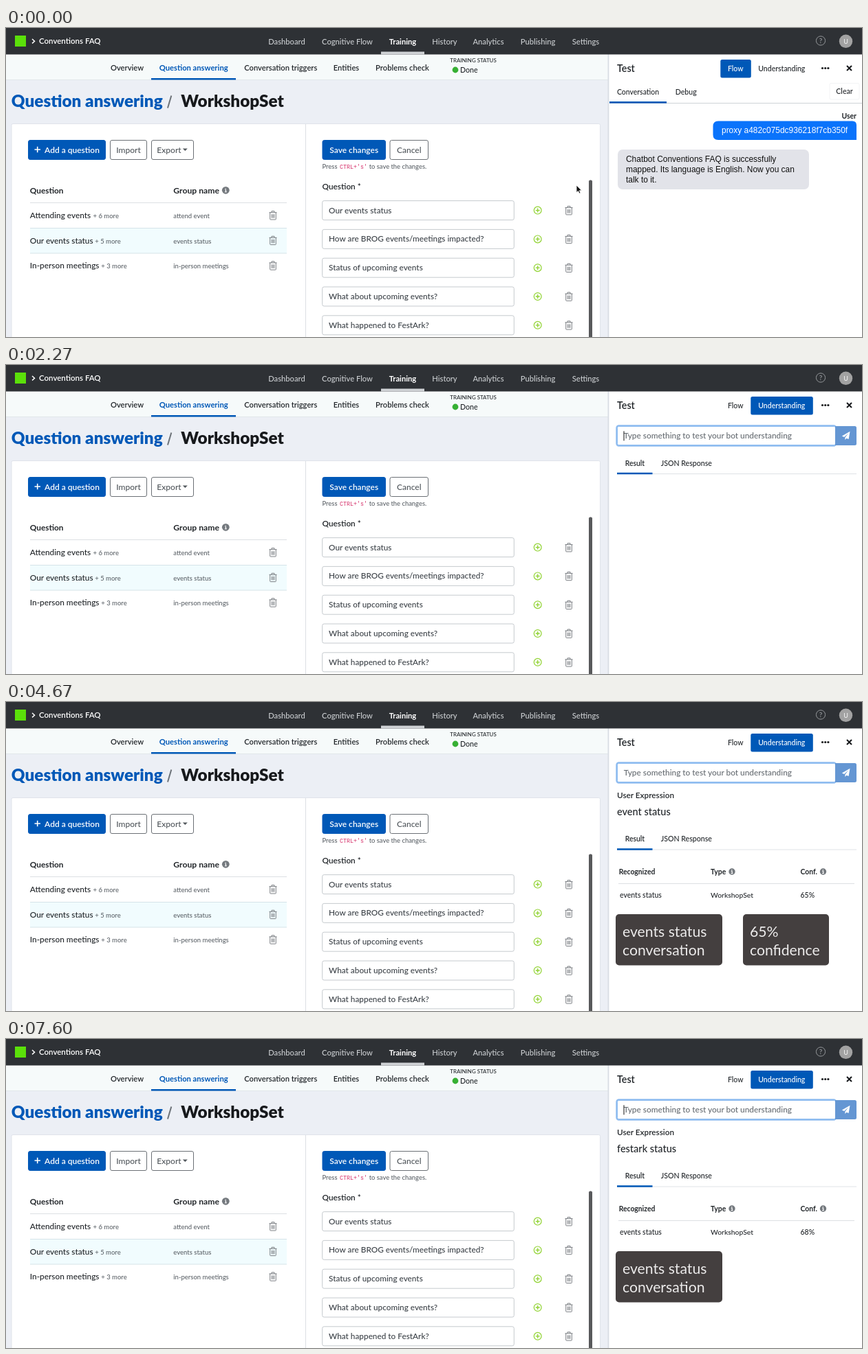
These frames come from a looping animation (1244 by 450 pixels, 8 s). An HTML page:

```html
<!DOCTYPE html>
<html lang="en">
<head>
<meta charset="utf-8">
<title>Bot training</title>
<style>
html, body { margin: 0; width: 100%; height: 100%; overflow: hidden; background: #fff; }
svg { display: block; width: 100%; height: 100%; }
text { font-family: Lato, "Open Sans", sans-serif; white-space: pre; }
.chat { font-family: "Liberation Sans", Arial, sans-serif; }
.mono { font-family: "Liberation Mono", "DejaVu Sans Mono", monospace; }
</style>
</head>
<body>
<svg id="stage" viewBox="0 0 1244 450" preserveAspectRatio="none"></svg>
<script>
const LOOP = 8000;
const BLUE = '#0058b7', INK = '#22262a', GREY = '#5c6268', LINE = '#dcdfe3';

// Markup helpers
const attrs = o => Object.entries(o).map(([k, v]) => ` ${k}="${v}"`).join('');
const text = (x, y, s, size, fill = INK, weight = 500, more = {}) =>
  `<text${attrs({ x, y, 'font-size': size, fill, 'font-weight': weight, ...more })}>${s}</text>`;
const mid = (x, y, s, size, fill, weight, more = {}) =>
  text(x, y, s, size, fill, weight, { 'text-anchor': 'middle', ...more });
const rect = (x, y, width, height, fill, more = {}) =>
  `<rect${attrs({ x, y, width, height, fill, ...more })}/>`;
const shape = (d, fill, more = {}) => `<path${attrs({ d, fill, ...more })}/>`;
const path = (d, stroke, width = 1) => shape(d, 'none', { stroke, 'stroke-width': width });
const dot = (cx, cy, r, fill, more = {}) => `<circle${attrs({ cx, cy, r, fill, ...more })}/>`;
const group = (id, body) => `<g id="${id}">${body}</g>`;
const hline = (x1, x2, y, color = LINE) => path(`M${x1} ${y}H${x2}`, color);

const button = (x, w, label, solid, cx = x + w / 2) =>
  rect(x + .5, 163.5, w - 1, 28, solid ? BLUE : '#fff',
    { rx: 2.5, stroke: solid ? BLUE : '#6b7075' }) +
  mid(cx, 181.5, label, 12, solid ? '#fff' : '#50565b', solid ? 600 : 500);

const trash = (x, y) => path(
  `M${x - 5.5} ${y - 4}h11M${x - 2} ${y - 4}v-2h4v2M${x - 4.3} ${y - 4}v9.5q0 .8 .8 .8h7q.8 0 .8-.8v-9.5` +
  `M${x - 1.8} ${y - 1.5}v5.5M${x} ${y - 1.5}v5.5M${x + 1.8} ${y - 1.5}v5.5`, '#74797e', .95);

const plus = (x, y) =>
  dot(x, y, 5.4, 'none', { stroke: '#8fd22f', 'stroke-width': 1.2 }) +
  path(`M${x - 3} ${y}h6M${x} ${y - 3}v6`, '#8fd22f', 1.3);

const info = (x, y, r) => dot(x, y, r, '#74797e') +
  path(`M${x - 1.2} ${y - .6}h1.4v3M${x - 1.5} ${y + 2.5}h3M${x - .2} ${y - 3}v1.3`, '#fff', 1.1);

const tip = (id, x, w, a, b) => group(id,
  rect(x, 309, w, 74.5, '#443f3f', { rx: 5 }) +
  text(x + 10, 342, a, 21.2, '#ecebeb', 400) +
  text(x + 10, 369, b, 21.2, '#ecebeb', 400));

function topBar() {
  const items = [[408, 'Dashboard'], [496, 'Cognitive Flow'], [576.5, 'Training'], [637.5, 'History'],
    [701, 'Analytics'], [773, 'Publishing'], [842.5, 'Settings']];
  return rect(0, 0, 1244, 38.5, '#2e3135') +
    rect(13, 11, 16, 16, '#5be00a') +
    path('M38 16l3.5 3.2-3.5 3.2', '#fff', 1.5) +
    text(48, 23.3, 'Conventions FAQ', 11.5, '#fff', 600) +
    items.map(([x, s], i) => mid(x, 23.8, s, 11.2, i == 2 ? '#fff' : '#cbced1', i == 2 ? 700 : 500)).join('') +
    rect(545, 34.5, 63, 4, '#cfd2d5') +
    dot(1184, 18.5, 6.6, 'none', { stroke: '#94979a' }) +
    mid(1184, 22, '?', 10, '#a4a7aa', 500) +
    dot(1220.5, 19.3, 9.7, '#a2a2a2') + mid(1220.5, 22.6, 'U', 9, '#f2f2f2', 500);
}

function subNav() {
  const items = [[176, 'Overview'], [272.7, 'Question answering'], [399.3, 'Conversation triggers'],
    [494.5, 'Entities'], [576, 'Problems check']];
  return rect(0, 38, 876, 37.5, '#f6fafa') + hline(0, 876, 75.5, '#e1e6ea') +
    items.map(([x, s], i) => mid(x, 61.7, s, 11.2, i == 1 ? BLUE : INK, i == 1 ? 700 : 600)).join('') +
    rect(211, 73, 123, 2.5, BLUE) +
    text(645.3, 50.3, 'TRAINING STATUS', 7.9, INK, 500) +
    dot(653, 61, 4.4, '#37b034') + text(660, 65, 'Done', 10.6);
}

function leftCard() {
  const rows = [['Attending events', '+ 6 more', 126.5, 'attend event'],
    ['Our events status', '+ 5 more', 129.3, 'events status'],
    ['In-person meetings', '+ 3 more', 138.3, 'in-person meetings']];
  return button(32, 113, 'Add a question', true, 96) +
    path('M41.5 177h8.5M45.7 172.7v8.6', '#fff', 1.6) +
    button(151, 54, 'Import') + button(211, 62, 'Export', false, 237) +
    shape('M256.8 175.5h7l-3.5 3.6z', '#50565b') +
    text(34.8, 240.8, 'Question', 11.8, INK, 700) +
    text(243.3, 240.8, 'Group name', 12.2, INK, 700) + info(319.3, 236.3, 5.4) +
    rect(35, 291.5, 373, 36.5, '#f1fcfe') +
    hline(35, 408, 254.5) + hline(35, 408, 291.5, '#d5e3e8') + hline(35, 408, 328, '#d5e3e8') +
    rows.map(([name, more, x, grp], i) => {
      const y = 277 + i * 36.6;
      return text(34.8, y, name, 11.85) + text(x, y, more, 9.5, GREY) +
        text(243.3, y, grp, 9.5, GREY) + trash(388, y - 4.3);
    }).join('');
}

function rightCard() {
  const questions = ['Our events status', 'How are BROG events/meetings impacted?',
    'Status of upcoming events', 'What about upcoming events?', 'What happened to FestArk?'];
  return button(459.5, 92.5, 'Save changes', true) + button(557.5, 56.5, 'Cancel') +
    text(459.5, 204.5, 'Press', 9.4, GREY) +
    text(485, 204.5, "CTRL+'s'", 8.35, '#d6336c', 400, { class: 'mono' }) +
    text(527.7, 204.5, 'to save the changes.', 9.4, GREY) +
    text(459.5, 234.5, 'Question *', 11.8, INK, 600) +
    questions.map((s, i) => {
      const y = 265.6 + i * 41.8;
      return rect(459.7, y - 14, 278.6, 28, '#fff', { rx: 2.5, stroke: '#c5cace' }) +
        text(469, y + 4, s, 11.8, '#3c4248') + plus(772.7, y) + trash(818, y);
    }).join('') +
    rect(847, 221.5, 5, 240, '#58595b', { rx: 2 });
}

const page = () =>
  rect(0, 0, 1244, 450, '#eceff5') + subNav() +
  text(7.8, 115, 'Question answering', 24.3, BLUE, 900) +
  path('M240.3 98.5L235 116.5', '#6c7278', 2) +
  text(254.3, 115, 'WorkshopSet', 24.3, '#17191c', 900) +
  rect(8, 139.5, 855.5, 320, '#fff', { rx: 2, stroke: '#dfe3ea' }) +
  path('M435.5 140V450', LINE) + leftCard() + rightCard();

const flowView = () =>
  text(888, 97.2, 'Conversation', 10.45) + text(972.7, 97.2, 'Debug', 10.6) +
  rect(1197, 80.5, 43, 23.5, '#fff', { rx: 2, stroke: '#f3f4f5' }) +
  mid(1218.5, 96, 'Clear', 10.6) +
  hline(877, 1244, 109.5, '#cfd3d7') + rect(877, 107, 83, 2.6, BLUE) +
  text(1236, 131.8, 'User', 10.4, INK, 700, { 'text-anchor': 'end' }) +
  shape('M1035 135.5H1230q6 0 6 6V163H1035q-7.5 0-7.5-7.5V143q0-7.5 7.5-7.5z', '#0a73fb') +
  text(1040, 153.2, 'proxy a482c075dc936218f7cb350f', 11.95, '#fff', 400, { class: 'chat' }) +
  rect(889, 177, 278, 58, '#e2e3e9', { rx: 7 }) +
  ['Chatbot Conventions FAQ is successfully', 'mapped. Its language is English. Now you can', 'talk to it.']
    .map((s, i) => text(901, 194.6 + i * 15, s, 11.95, '#111', 400, { class: 'chat' })).join('');

const testView = () =>
  rect(887.5, 88.5, 318.5, 29, 'none', { id: 'glow', rx: 3, stroke: '#8ebcf0', 'stroke-width': 2.4 }) +
  rect(888.5, 89.5, 317, 27, '#fff', { id: 'field', rx: 2 }) +
  shape('M1205 89H1233.5q2.5 0 2.5 2.5V114.5q0 2.5-2.5 2.5H1205z', BLUE, { id: 'send' }) +
  shape('M1226.5 96.8L1214.8 103.6l3.3 1.5 6-5.5-4.7 6.2v3.2l2-2.3 3.2 1.4z', '#fff') +
  text(897.7, 107, '', 11.87, GREY, 500, { id: 'typed' }) +
  rect(0, 96.3, 1, 14, '#111', { id: 'caret' }) +
  group('said', text(888, 139.8, 'User Expression', 11.75, INK, 600) +
    text(888, 164.5, '', 14.5, INK, 500, { id: 'phrase' })) +
  group('tabs', text(899.7, 146.6, 'Result', 10.4, INK, 600) + text(951.7, 146.6, 'JSON Response', 10.6) +
    hline(888, 1236, 158.5, '#dfe2e6') + rect(888, 156.7, 51.5, 2.5, BLUE)) +
  group('table',
    text(890.7, 251, 'Recognized', 10.35, INK, 700) +
    text(1024, 251, 'Type', 10.4, INK, 700) + info(1055, 247, 4.7) +
    text(1154.5, 251, 'Conf.', 10.4, INK, 700) + info(1187.5, 247, 4.7) +
    hline(890, 1233, 264.5) +
    text(892, 285, 'events status', 10.5) + text(1024, 285, 'WorkshopSet', 10.4) +
    text(1154.5, 285, '', 10.5, INK, 500, { id: 'conf' })) +
  tip('tipName', 886, 155, 'events status', 'conversation') +
  tip('tipConf', 1071, 125, '65%', 'confidence');

const panel = () =>
  rect(874.5, 38, 2, 412, '#d9dde4') + rect(876.5, 38, 368, 412, '#fff') +
  text(888, 63.9, 'Test', 14.3, INK, 600) +
  rect(0, 46, 0, 26.5, BLUE, { id: 'mode', rx: 2.5 }) +
  mid(1060.3, 63, 'Flow', 10.5, INK, 500, { id: 'flowLabel' }) +
  mid(1127.3, 63, 'Understanding', 10.5, INK, 500, { id: 'testLabel' }) +
  [1186.5, 1190.7, 1194.9].map(x => dot(x, 58.5, 1.6, '#17191c')).join('') +
  path('M1222 55l7 7M1229 55l-7 7', '#17191c', 2) +
  group('flowView', flowView()) + group('testView', testView());

const pointers = () =>
  group('arrow', shape('M0 0V10.6L2.5 8.4 4.1 12 5.9 11.2 4.3 7.7H7.5z', '#111',
    { stroke: '#fff', 'stroke-width': .8 })) +
  group('hand', shape('M-1 1q0-1.2 1-1.2t1 1.2V5.3q3.500-.3 6 1.2v4l-1.5 3.5h-5.5L-4 8.7q0-1.6 3 .6z', '#fff',
    { stroke: '#111', 'stroke-width': .9 })) +
  group('beam', path('M-2.5-5.5Q0-5.5 0-4V4Q0 5.5-2.5 5.5M2.5-5.5Q0-5.5 0-4M0 4Q0 5.5 2.5 5.5M-1.3 1.5h2.6', '#222'));

const stage = document.getElementById('stage');
stage.innerHTML = page() + panel() + topBar() + pointers();
const el = {};
stage.querySelectorAll('[id]').forEach(n => el[n.id] = n);

const show = (n, on) => n.setAttribute('display', on ? 'inline' : 'none');
const set = (n, o) => Object.entries(o).forEach(([k, v]) => n.setAttribute(k, v));
const label = (n, s) => { if (n.textContent !== s) n.textContent = s; };

// Number of steps done out of n even ones, the first at a and the last at b
const steps = (t, a, b, n) =>
  t < a ? 0 : Math.min(n, Math.floor((t - a + .5) / (b - a) * (n - 1)) + 1);
const smooth = p => p * p * (3 - 2 * p);
const mix = (a, b, p) => a + (b - a) * p;

const HOME = [829, 229], MODE = [1122, 56], FIELD = [1025, 98];

function pointerAt(t) {
  const [from, to, p] = t < 1670
    ? [HOME, MODE, steps(t, 270, 800, 9) / 9]
    : [MODE, FIELD, steps(t, 1670, 2000, 6) / 6];
  return from.map((v, i) => mix(v, to[i], smooth(p)));
}

function typedAt(t) {
  if (t < 3530) {
    const n = Math.max(0, steps(t, 2200, 3000, 12) - 1) + (t >= 3070);
    return 'event status'.slice(0, n);
  }
  if (t < 5730 || t >= 7130) return '';
  const ending = steps(t, 6200, 6330, 3);
  const n = steps(t, 5730, 5930, 4) + ending + (ending == 3) + steps(t, 6600, 6930, 6);
  return 'festark status'.slice(0, n);
}

function render(t) {
  const testing = t >= 1270;
  const [x, y] = pointerAt(t);
  const overMode = x > 1038 && x < 1173 && y > 45 && y < 73;
  const overField = testing && y > 88 && x < 1205;
  const visible = t < 2200;
  [['arrow', !overMode && !overField], ['hand', overMode], ['beam', overField]].forEach(([id, on]) => {
    show(el[id], visible && on);
    set(el[id], { transform: `translate(${x} ${y})` });
  });

  set(el.mode, testing ? { x: 1082.3, width: 90.5 } : { x: 1038.3, width: 44.5 });
  set(el.flowLabel, { fill: testing ? INK : '#fff' });
  set(el.testLabel, { fill: testing ? '#fff' : overMode ? BLUE : INK });
  show(el.flowView, !testing);
  show(el.testView, testing);
  if (!testing) return;

  const focus = t >= 2200 ? 1 : t >= 2000 ? .4 : 0;
  const typed = typedAt(t);
  set(el.glow, { opacity: focus });
  set(el.field, { stroke: focus ? '#8fbdf0' : '#c5cace' });
  set(el.send, { fill: typed ? BLUE : '#6496d3' });
  label(el.typed, typed || 'Type something to test your bot understanding');
  set(el.typed, { fill: typed ? '#3c4248' : '#666c72' });
  show(el.caret, focus == 1 && !(t >= 4070 && t < 5600));
  set(el.caret, { x: 897.7 + (typed ? el.typed.getComputedTextLength() : -.2) });

  const answered = t >= 3530;
  show(el.said, answered);
  label(el.phrase, t < 7130 ? 'event status' : 'festark status');
  set(el.tabs, { transform: `translate(0 ${answered ? 56.5 : 0})` });
  show(el.table, t >= 3600);
  label(el.conf, t < 7200 ? '65%' : '68%');
  show(el.tipName, t >= 4070 && t < 5600 || t >= 7600);
  show(el.tipConf, t >= 4670 && t < 5600);
}

const start = performance.now();
function tick() {
  render((performance.now() - start) % LOOP);
  requestAnimationFrame(tick);
}
tick();
</script>
</body>
</html>
```
